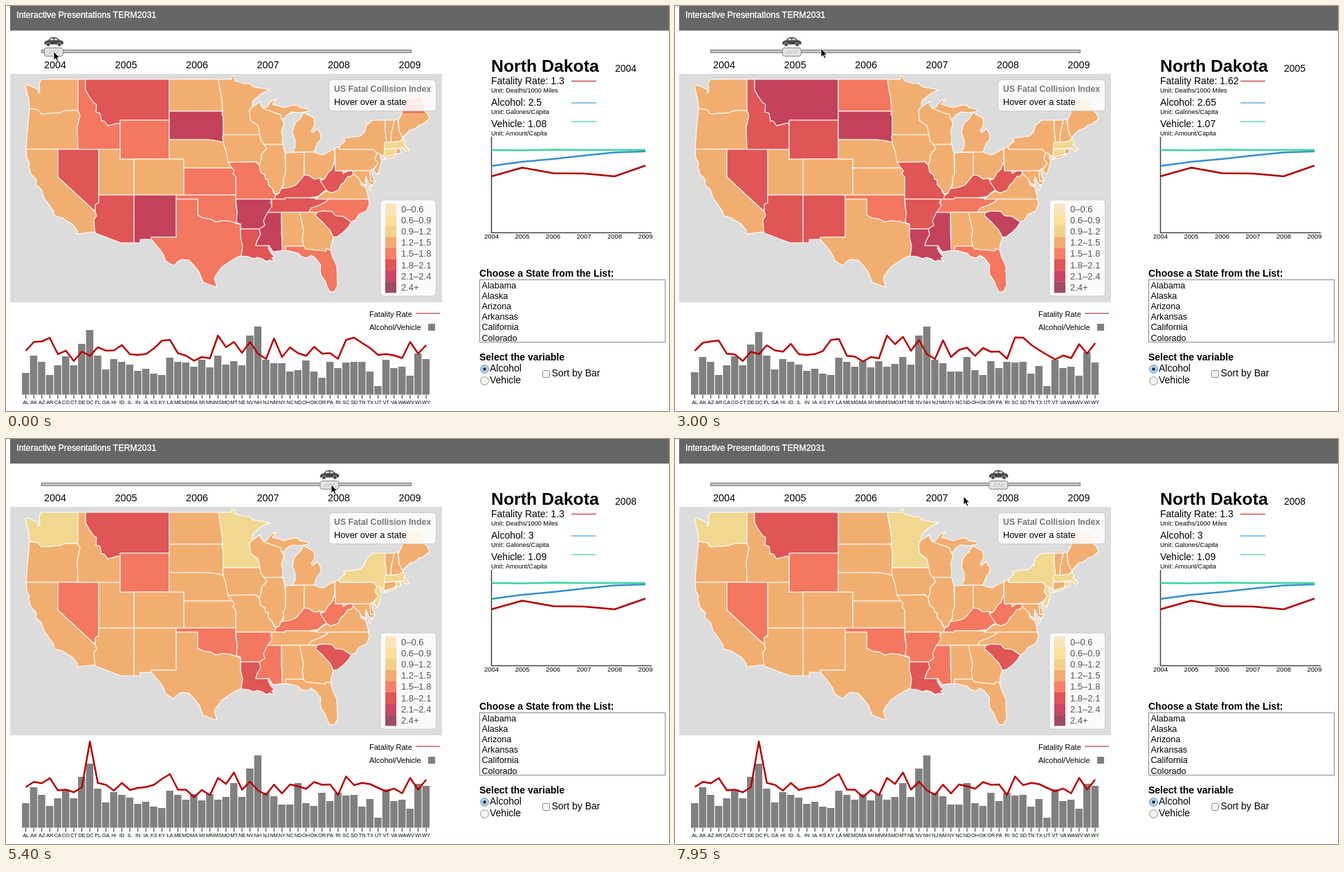
An HTML page that plays this animation: 958 px wide and 585 px high, repeating every 8 s.

```html
<!DOCTYPE html>
<html lang="en">
<head>
<meta charset="utf-8">
<title>Traffic dashboard</title>
<style>
html, body { margin: 0; width: 100%; height: 100%; overflow: hidden; background: #fff; }
svg { display: block; width: 100vw; height: 100vh; font: 14px "Liberation Sans", Arial, sans-serif; }
.b { font-weight: bold; }
.m { text-anchor: middle; }
.u { font-size: 9.1px; }
.l { fill: none; stroke-width: 2.5; stroke-linejoin: round; }
#states { stroke: #fff; stroke-width: 1.1; stroke-linejoin: round; }
</style>
</head>
<body>
<svg viewBox="0 0 958 585">
<path fill="#666" d="M6 0H958V35.5H6z"/>
<text x="15" y="17" font-size="12.4" fill="#fff" stroke="#fff" stroke-width=".35">Interactive Presentations TERM2031</text>

<rect x="51.5" y="63.5" width="534" height="4" fill="#c4c4c4" stroke="#777"/>
<g id="years" class="m" font-size="14.3"></g>
<g id="handle">
  <rect x="-13.5" y="60.5" width="27" height="12" rx="3" fill="#e2e2e2" stroke="#888"/>
  <path d="M-7 69l4-5M-2 69l4-5M3 69l4-5" stroke="#aaa"/>
  <path fill="#444" d="M-13.5 55.5Q-14.5 50.5-8.5 49.8L-5 46Q0 44.3 4.500 45.800L9 49.500Q13.500 50 14 52.500L13.500 55.500z"/>
  <path fill="#ddd" d="M-6.500 49.500L-4 46.800H-.5V49.500zM.8 46.800H4L6.500 49.500H.8z"/>
  <g fill="#444" stroke="#ccc" stroke-width=".8"><circle cx="-8" cy="55.500" r="2.700"/><circle cx="8" cy="55.500" r="2.700"/></g>
</g>

<path fill="#dcdcdc" d="M6 98H630V428H6z"/>
<g id="states">
<path id="WA" d="M28 115 32 114 47 121 46 126 49 124 48 112 51 106 104 106 104 151 86 151 78 154 66 155 51 156 46 150 34 148 33 136z"/>
<path id="OR" d="M34 148 46 150 51 156 66 155 78 154 86 151 104 151 107 158 103 175 104 207 29 207 31 180z"/>
<path id="CA" d="M29 207 75 207 75 247 129 297 131 303 127 309 128 322 130 326 103 329 103 324 96 315 89 311 81 306 70 303 69 297 63 288 55 277 51 265 43 258 44 251 36 243 33 231 34 227 30 219z"/>
<path id="NV" d="M75 207H134V284L129 287V297L75 247z"/>
<path id="UT" d="M134 207H165V221H185V273H134z"/>
<path id="ID" d="M104 106 115 106 115 121 120 130 127 140 131 142 130 153 136 155 138 166 142 166 147 173 162 169 165 171 165 207 104 207 103 175 107 158 104 151z"/>
<path id="MT" d="M115 106 236 106 236 165 165 165 165 171 162 169 147 173 142 166 138 166 136 155 130 153 131 142 127 140 120 130 115 121z"/>
<path id="WY" d="M165 165H236V221H165z"/>
<path id="CO" d="M185 221H257V273H185z"/>
<path id="AZ" d="M134 273 185 273 185 342 166 342 129 328 128 322 127 309 131 303 129 297 129 287 134 284z"/>
<path id="NM" d="M185 273H246V334H210L212 337H194V342H185z"/>
<path id="ND" d="M236 106 307 106 309 120 312 135 313 152 236 152z"/>
<path id="SD" d="M236 152 313 152 312 156 314 160 314 183 313 190 314 197 306 195 300 194 291 193 236 193z"/>
<path id="NE" d="M236 193 291 193 300 194 306 195 314 197 318 210 321 221 328 234 257 234 257 221 236 221z"/>
<path id="KS" d="M257 234 327 234 330 238 328 242 332 247 332 273 257 273z"/>
<path id="OK" d="M246 273 332 273 332 286 334 298 333 314 324 311 313 310 303 312 296 308 284 306 277 302 277 279 246 279z"/>
<path id="TX" d="M246 279 277 279 277 302 284 306 296 308 303 312 313 310 324 311 333 314 339 316 339 334 342 347 340 360 332 364 322 370 311 378 303 389 301 394 305 406 298 404 285 399 282 392 279 384 272 375 264 367 254 366 248 369 243 375 235 371 230 367 228 360 222 351 210 337 210 334 246 334z"/>
<path id="MN" d="M307 106 326 106 326 101 329 101 331 108 344 112 352 112 358 117 381 121 370 126 358 136 356 140 356 146 352 150 353 165 364 173 367 186 314 186 314 160 312 156 313 152 312 135 309 120z"/>
<path id="IA" d="M314 186 367 186 368 193 373 200 377 206 372 211 369 215 369 221 366 230 361 225 321 226 318 210 314 197 313 190z"/>
<path id="MO" d="M321 226 361 225 366 230 368 240 374 244 375 250 379 251 379 258 385 264 387 270 391 275 388 285 382 285 384 279 332 279 332 247 328 242 330 238 326 233z"/>
<path id="AR" d="M332 279 384 279 382 285 387 285 384 293 380 300 376 310 374 322 339 322 339 315 333 313 334 298z"/>
<path id="LA" d="M339 322 366 322 368 330 363 339 361 346 380 346 379 350 383 357 388 362 384 364 388 369 381 367 376 369 370 365 363 363 358 365 350 362 340 361 342 347 339 334z"/>
<path id="MS" d="M378 298 398 298 398 330 400 353 386 355 380 346 361 346 363 339 368 330 366 322 374 317 372 310 376 302z"/>
<path id="WI" d="M352 150 356 146 368 138 368 143 373 148 385 153 393 156 398 158 398 163 402 169 398 181 400 190 399 200 373 200 368 193 367 186 364 173 353 165z"/>
<path id="MI" d="M371 148 377 146 383 138 391 134 385 142 393 144 402 147 411 144 421 143 425 147 437 149 437 152 425 154 413 153 405 158 402 163 398 163 397 157 385 153zM430 154 445 162 446 172 441 180 443 183 450 177 455 186 455 192 450 198 445 211 414 211 418 203 418 195 414 184 416 173 420 167 425 163z"/>
<path id="IL" d="M373 200 400 200 403 212 404 242 401 250 401 258 397 264 395 270 389 272 385 264 379 258 379 251 375 250 374 244 368 240 366 230 369 221 369 215 372 211 377 206z"/>
<path id="IN" d="M404 212 431 211 431 244 427 249 423 254 418 259 410 262 399 265 401 258 401 250 404 242z"/>
<path id="OH" d="M431 211 445 211 452 214 458 215 467 210 475 206 475 224 471 236 466 240 463 245 460 250 454 249 445 250 438 245 431 244z"/>
<path id="KY" d="M388 279 390 273 395 270 397 264 410 262 418 259 423 254 427 249 431 244 438 245 445 250 454 249 459 259 464 265 458 269 451 275 437 277 404 277 403 279z"/>
<path id="TN" d="M384 279 403 279 404 277 437 277 466 279 462 283 452 288 441 292 437 298 378 298 384 290z"/>
<path id="VA" d="M447 279 458 270 464 267 470 270 480 266 484 258 488 255 494 246 498 246 503 241 508 246 511 250 513 258 520 262 522 270 524 279zM529 259 526 267 524 262z"/>
<path id="WV" d="M475 224 476 238 487 238 487 242 492 239 499 237 503 241 498 246 494 246 488 255 484 258 480 266 470 270 464 267 459 260 454 252 460 250 463 245 466 240 471 236z"/>
<path id="PA" d="M475 206 482 203 482 207 531 207 536 213 533 221 538 227 532 234 526 238 476 238z"/>
<path id="NY" d="M482 207 482 202 490 195 488 191 504 189 512 188 518 182 521 172 530 165 548 165 548 180 550 197 547 207 546 217 534 211 531 207zM545 222 551 218 568 212 558 219z"/>
<path id="NJ" d="M536 212 541 214 541 220 543 222 541 231 537 244 531 237 538 227 533 221z"/>
<path id="VT" d="M548 165H561L559 175 557 183 556 197H550L548 180z"/>
<path id="NH" d="M561 165 564 163 566 164 568 180 574 191 570 195 556 197 557 183 559 175z"/>
<path id="ME" d="M567 165 572 155 573 147 581 134 585 133 590 134 596 131 602 136 605 152 609 155 612 163 603 170 597 172 591 177 584 179 577 186 573 190 568 180z"/>
<path id="MA" d="M547 197 556 197 570 195 574 192 577 196 575 200 580 205 583 208 578 210 574 205 547 207z"/>
<path id="CT" d="M547 207 564 206 563 214 546 219z"/>
<path id="RI" d="M564 206 569 206 571 212 563 214z"/>
<path id="MD" d="M487 238 526 238 527 253 533 253 530 259 524 256 520 246 519 252 521 259 514 256 511 250 504 244 499 237 492 239 487 242z"/>
<path id="DE" d="M526 238 529 237 529 243 533 253 527 253z"/>
<path id="NC" d="M466 279 524 279 525 286 521 296 510 301 505 309 499 312 487 304 476 303 471 297 457 296 449 298 437 298 441 292 452 288 462 283z"/>
<path id="SC" d="M447 303 449 298 457 296 471 297 476 303 487 304 499 312 494 320 488 326 479 333 473 334 468 324 458 313z"/>
<path id="GA" d="M424 298 449 298 447 303 458 313 468 324 473 334 470 345 469 352 463 351 462 354 433 351 430 347 428 335 430 325z"/>
<path id="AL" d="M398 298 424 298 430 325 428 335 430 347 404 347 406 353 399 354z"/>
<path id="FL" d="M404 347 430 347 433 351 462 354 463 351 469 352 472 363 478 376 479 404 475 412 468 413 464 405 461 397 455 388 454 382 455 374 447 364 441 360 435 364 427 362 422 357 410 354 404 353z"/>
</g>
<path id="tip" fill="#f4775f" d="M573 155V147L581 134 585 133 590 134 596 131 602 136 605 155z"/>

<g fill="#fff" fill-opacity=".87" stroke="#ccc">
  <rect x="467" y="106.500" width="154.500" height="45" rx="5"/>
  <rect x="541" y="280" width="80.500" height="139" rx="5"/>
</g>
<text x="474" y="124" class="b" font-size="12.3" fill="#777">US Fatal Collision Index</text>
<text x="474" y="143" font-size="12.8">Hover over a state</text>
<g id="legend" font-size="13" fill="#555"></g>

<g font-size="11">
  <text x="525" y="449">Fatality Rate</text>
  <text x="525" y="468">Alcohol/Vehicle</text>
</g>
<path d="M592 444H627" stroke="#d05a5a" stroke-width="1.500"/>
<path fill="#808080" d="M610 459H620V469H610z"/>
<path id="bars" fill="#808080"/>
<path id="rates" class="l" stroke="#b80000"/>
<g id="axis" class="m" font-size="7.3"></g>

<text x="701" y="95" class="b" font-size="24.8">North Dakota</text>
<text id="year" x="880" y="95"></text>
<text id="rate" x="701" y="113"></text>
<text x="701" y="125" class="u">Unit: Deaths/1000 Miles</text>
<text id="alc" x="701" y="144"></text>
<text x="701" y="156" class="u">Unit: Galones/Capita</text>
<text id="veh" x="701" y="175"></text>
<text x="701" y="187" class="u">Unit: Amount/Capita</text>
<g stroke-width="1.500">
  <path d="M817 108.500H853" stroke="#cc5050"/>
  <path d="M817 140H853" stroke="#62b0e4"/>
  <path d="M817 167H853" stroke="#5fdcaa"/>
</g>
<path d="M701.500 189V327.500H933" fill="none" stroke="#444" stroke-width="1.500"/>
<g id="trend" class="l"></g>
<g id="ticks" class="m" font-size="9.500"></g>

<text x="684" y="391" class="b">Choose a State from the List:</text>
<rect x="684.500" y="395.500" width="268" height="90" fill="#fff" stroke="#888"/>
<g id="list" font-size="12.600"></g>
<text x="684" y="512" class="b">Select the variable</text>
<g stroke="#888">
  <circle cx="691.500" cy="524.500" r="5.800" fill="#b4d8f4" stroke="#5a80a8"/>
  <circle cx="691.500" cy="541.500" r="5.800" fill="#f6f6f6"/>
  <rect x="775.500" y="526.500" width="10" height="10" rx="2" fill="#f6f6f6"/>
</g>
<circle cx="691.500" cy="524.500" r="2.200" fill="#123"/>
<text x="699" y="528">Alcohol</text>
<text x="699" y="545">Vehicle</text>
<text x="788.500" y="535">Sort by Bar</text>
<path id="cursor" d="M0 0V12L2.800 9.500 4.800 14 6.800 13.200 4.900 8.800H8.500z" stroke="#fff" stroke-width=".8"/>
</svg>
<script>
const $ = id => document.getElementById(id);
const text = (x, y, s) => `<text x="${x}" y="${y}">${s}</text>`;
const codes = ('AL AK AZ AR CA CO CT DE DC FL GA HI ID IL IN IA KS KY LA ME MD MA MI MN MS MO MT ' +
  'NE NV NH NJ NM NY NC ND OH OK OR PA RI SC SD TN TX UT VT VA WA WV WI WY').split(' ');
const byCode = list => Object.fromEntries(codes.map((c, i) => [c, list[i]]));

// Each year keeps the previous values except where they change.
const years = [];
function addYear(alcohol, vehicle, rate, bar) {
  const last = years[years.length - 1] || {};
  years.push({ alcohol, vehicle, rate: { ...last.rate, ...rate }, bar: { ...last.bar, ...bar } });
}
addYear(2.5, 1.08, byCode([
  1.44, 1.95, 1.98, 2.19, 1.25, 1.45, .85, 1.4, 1.15, 1.65, 1.45, 1.46, 1.77, 1.24, 1.2, 1.25, 1.57,
  2.02, 2.07, 1.3, 1.16, .87, 1.08, 1, 2.32, 1.65, 1.95, 1.32, 1.95, 1.27, .97, 2.15, 1.08, 1.64, 1.3,
  1.15, 1.67, 1.28, 1.3, .98, 2.07, 2.2, 1.89, 1.6, 1.2, 1.25, 1.17, 1.02, 1.95, 1.28, 1.77
]), byCode([
  31, 56, 47, 28, 42, 55, 42, 73, 93, 56, 36, 51, 47, 43, 34, 37, 30, 28, 53, 47, 46, 40, 50, 39, 56, 43, 48,
  42, 85, 98, 50, 45, 45, 33, 35, 49, 33, 24, 47, 38, 46, 47, 47, 33, 12, 50, 38, 40, 27, 59, 51
]));
addYear(2.65, 1.07, {
  AK: 1.9, AR: 2.03, CA: 1.27, CO: 1.23, DE: 1.38, DC: 1.25, FL: 1.76, GA: 1.46, HI: 1.39, ID: 1.84, KS: 1.43,
  KY: 2.07, LA: 2.12, ME: 1.15, MD: 1.1, MA: .82, MO: 1.82, MT: 2.25, NE: 1.44, NV: 2.06, NH: 1.24,
  NM: 2.04, NC: 1.49, ND: 1.62, OK: 1.6, OR: 1.38, PA: 1.4, SC: 2.21, TN: 1.79, TX: 1.48, VT: .94, WV: 1.82, WY: 1.88
}, { AL: 32, AK: 54, DE: 72, DC: 90, MD: 40, MA: 48, MI: 39, MN: 48, MS: 40, MO: 44, MT: 54, NE: 43,
  NY: 33, NC: 33, ND: 54, OH: 35, OK: 28, OR: 48, PA: 38, RI: 47, TN: 30, TX: 41, WV: 27, WI: 61, WY: 46 });
addYear(2.74, 1.1, {
  AK: 1.95, AZ: 2.07, AR: 1.99, DE: 1.57, DC: 1, FL: 1.65, ID: 1.76, KS: 1.55, KY: 1.9, LA: 2.17, ME: 1.25,
  MN: .87, MO: 1.59, MT: 2.28, NE: 1.39, NV: 1.97, NH: .88, NM: 1.87, MS: 2.18, NC: 1.43, ND: 1.4, SC: 2.08, SD: 2.08,
  TN: 1.78, WV: 1.96, WY: 2.07
}, { AL: 33, AK: 56, DE: 73, DC: 91, MT: 60, NE: 44, NH: 101, ND: 56, OK: 31, OR: 50, RI: 50, VT: 55, WI: 63, WY: 57 });
addYear(2.88, 1.09, {
  AL: 1.35, AK: 1.76, AZ: 1.68, CO: 1.1, DE: 1.24, DC: 1.22, FL: 1.56, HI: 1.33, ID: 1.6, KS: 1.38, KY: 1.77,
  LA: 2.19, MO: 1.43, MT: 2.45, MS: 2.04, NV: 1.68, NH: .96, NM: 1.45, NC: 1.62, SD: 1.62, TN: 1.7, TX: 1.42,
  VT: .86, RI: .8, MN: .89, WV: 2.07, WI: 1.25, WY: 1.4
}, { AL: 35, AK: 54, AR: 30, DC: 94, MT: 63, NH: 102, ND: 61, WY: 59 });
addYear(3, 1.09, {
  AL: 1.25, AK: 1.55, AZ: 1.47, AR: 1.77, CA: 1.06, CT: .95, DC: 3.88, FL: 1.49, GA: 1.38, HI: 1.05, ID: 1.49, IL: 1.08,
  KY: 1.72, LA: 2, ME: 1.1, MA: .67, MN: .78, MS: 1.78, MT: 2.09, NE: 1.1, NV: 1.56, NH: 1.06, NJ: .81, NM: 1.39,
  NY: .89, NC: 1.4, ND: 1.3, OK: 1.54, SC: 1.86, SD: 1.36, TN: 1.49, VT: 1, WA: .89, WV: 1.78, WI: 1.1, WY: 1.68
}, { AK: 58, AR: 31, DC: 92, MT: 64, NH: 104, ND: 64, UT: 14, WY: 60 });
addYear(3.03, 1.09, {
  AL: 1.16, AK: 1.48, AZ: 1.3, CO: 1, CT: .8, DE: 1.28, DC: .8, FL: 1.3, GA: 1.18, ID: 1.47, IL: .86, IN: .87, KY: 1.67,
  LA: 1.79, MI: .88, MN: .74, MS: 1.73, MO: 1.37, MT: 1.97, NV: 1.19, NH: .85, NY: .86, MA: .59, ND: 1.7,
  OH: .89, RI: 1.01, SC: 1.79, TN: 1.4, TX: 1.34, UT: .89, VA: .89, WA: .87, WV: 1.77, WY: 1.36
}, { AK: 65, AR: 29, HI: 53, ID: 54, MT: 66, NH: 107, ND: 67, UT: 12, WY: 58 });

const fills = ['#f9e2b4', '#f1d890', '#f2ae70', '#f2ae70', '#f4775f', '#e05555', '#c4415a', '#98405c'];
const swatches = ['#f9e5bc', '#fbdf9a', '#f3d08c', '#f2ac6f', '#f87f68', '#e05555', '#cc4563', '#a04a66'];
const limits = [.6, .9, 1.2, 1.5, 1.8, 2.1, 2.4];
const fillFor = rate => fills[limits.filter(n => rate >= n).length];

const step = 11.57;
const barX = i => 28.6 + i * step;
const span = [0, 1, 2, 3, 4, 5];
const trendX = i => 701.5 + i * 44.5;
const line = points => 'M' + points.map(p => p.map(n => n.toFixed(1)).join(' ')).join('L');

$('years').innerHTML = span.map(i => text(71 + i * 102.5, 90, 2004 + i)).join('');
$('ticks').innerHTML = span.map(i => text(trendX(i), 336, 2004 + i)).join('');
$('legend').innerHTML = swatches.map((c, i) =>
  `<rect x="548" y="${285.5 + i * 16.1}" width="16" height="16.2" fill="${c}"/>` +
  text(571, 298 + i * 16.1, i === 7 ? '2.4+' : `${limits[i - 1] || 0}–${limits[i]}`)).join('');
$('axis').innerHTML = '<path stroke="#222" d="' + codes.map((c, i) => `M${barX(i)} 562v5`).join('') + '"/>' +
  codes.map((c, i) => text(barX(i), 575, c)).join('');
$('list').innerHTML = ['Alabama', 'Alaska', 'Arizona', 'Arkansas', 'California', 'Colorado']
  .map((s, i) => text(687.5, 408 + i * 15.1, s)).join('');
$('trend').innerHTML = [
  ['#b00000', [246, 233.5, 241.5, 242, 246, 230.5]],
  ['#3490d0', [231, 225, 221, 216, 211.5, 210]],
  ['#3ad59a', [208, 208.5, 207.5, 208, 208, 208]]
].map(([c, ys]) => `<path stroke="${c}" d="${line(ys.map((y, i) => [trendX(i), y]))}"/>`).join('');

let shown = -1;
function showYear(n) {
  if (n === shown) return;
  shown = n;
  const { alcohol, vehicle, rate, bar } = years[n];
  $('handle').setAttribute('transform', `translate(${69 + n * 99.6})`);
  codes.forEach(c => $(c) && $(c).setAttribute('fill', fillFor(rate[c])));
  $('tip').style.display = n === 0 || n === 2 ? '' : 'none';
  $('bars').setAttribute('d', codes.map((c, i) =>
    `M${(barX(i) - 5.5).toFixed(1)} 561.5v${-bar[c] - .5}h10.5v${bar[c] + .5}z`).join(''));
  $('rates').setAttribute('d', line(codes.map((c, i) => [barX(i), 534 - 25 * rate[c]])));
  $('year').textContent = 2004 + n;
  $('rate').textContent = 'Fatality Rate: ' + rate.ND;
  $('alc').textContent = 'Alcohol: ' + alcohol;
  $('veh').textContent = 'Vehicle: ' + vehicle;
}

// Pointer path: time, x, y
const keys = [
  [0, 69, 66], [1350, 69, 66], [2100, 154, 63], [2400, 167, 62], [2700, 167, 62], [3300, 255, 61], [3450, 255, 61],
  [3750, 294, 68], [3900, 294, 68], [4050, 301, 68], [4500, 385, 66], [4800, 385, 66], [4950, 414, 66],
  [5400, 470, 66], [5700, 470, 66], [6000, 547, 65], [6300, 572, 65], [6450, 572, 65], [6900, 516, 67],
  [7350, 484, 67], [7500, 484, 67], [7950, 417, 83], [8100, 417, 83]
];
function pointer(t) {
  const i = keys.findIndex(k => k[0] > t);
  const [t0, x0, y0] = keys[i - 1], [t1, x1, y1] = keys[i];
  const p = (t - t0) / (t1 - t0);
  return [x0 + (x1 - x0) * p, y0 + (y1 - y0) * p];
}

function draw(ms) {
  const t = Math.floor(ms % 8000 / 150) * 150;
  const [x, y] = pointer(t);
  $('cursor').setAttribute('transform', `translate(${x} ${y})`);
  showYear(Math.round((x - 67) / 99.6));
}

const start = performance.now();
function tick() {
  draw(performance.now() - start);
  requestAnimationFrame(tick);
}
tick();
</script>
</body>
</html>
```
